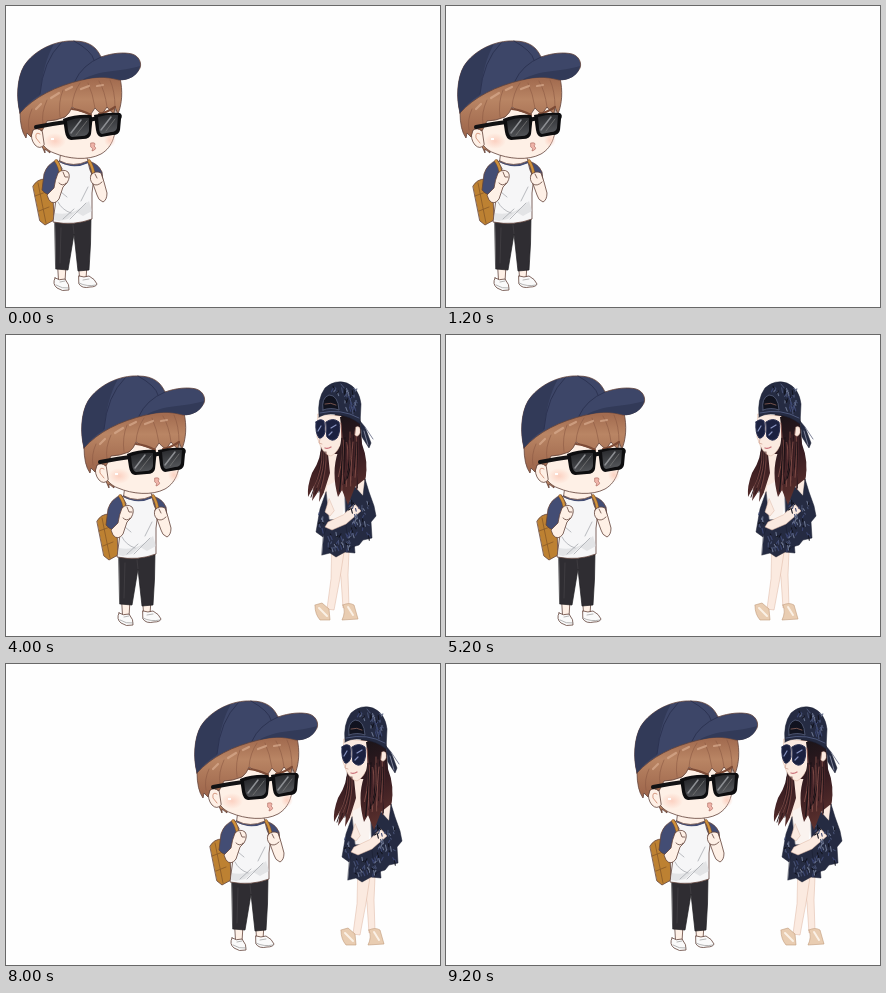
Recreate the animation shown at these times as an HTML page. Size 434 by 301 pixels, loop 10000 ms.

```html
<!DOCTYPE html>
<html lang="en">
<head>
<meta charset="utf-8">
<title>Two walkers</title>
<style>
  html, body { margin: 0; width: 100%; height: 100%; overflow: hidden; background: #fefefe; }
  svg { display: block; width: 434px; height: 301px; }
  path, ellipse { stroke-linejoin: round; stroke-linecap: round; }
  .line { fill: none; }
  .ink { stroke: #63433a; stroke-width: .8; }
  .skin { fill: #fef0e6; }
  .denim { fill: #252b42; stroke: #191d2e; stroke-width: .5; }
  .pale { fill: #fbeae0; stroke: #dcb5a1; stroke-width: .5; }
</style>
</head>
<body>
<svg viewBox="0 0 434 301">
  <defs>
    <linearGradient id="hair" x2="0" y2="1">
      <stop offset=".1" stop-color="#a36c50"/><stop offset=".4" stop-color="#b98564"/><stop offset="1" stop-color="#9b6349"/>
    </linearGradient>
    <linearGradient id="locks" x2=".2" y2="1">
      <stop stop-color="#191419"/><stop offset=".5" stop-color="#351b20"/><stop offset="1" stop-color="#5b302d"/>
    </linearGradient>
    <linearGradient id="glass" x2=".4" y2="1">
      <stop stop-color="#1b1c1f"/><stop offset="1" stop-color="#55575b"/>
    </linearGradient>
    <radialGradient id="blush">
      <stop stop-color="#fbc4b2" stop-opacity=".7"/><stop offset="1" stop-color="#fbc4b2" stop-opacity="0"/>
    </radialGradient>
  </defs>

  <g id="boy">
    <!-- backpack, legs and shoes -->
    <path class="ink" fill="#bd8132" d="M27 180Q31 173 39 173L47 190 48 214 39 219 34 215Z"/>
    <path class="line" stroke="#8a5a28" stroke-width=".8" d="M32 177L40 217M29 190L40 186M33 205L43 201"/>
    <path class="ink skin" d="M52 259H60L59 276H53ZM73 259H81L80 273H74Z"/>
    <path class="ink" fill="#fafafa" d="M49 272Q53 275 59 273Q64 279 63 284Q56 286 51 282Q46 278 49 272ZM73 270Q78 272 83 270Q89 273 91 278Q90 281 84 281Q76 283 73 278Z"/>
    <path class="line" stroke="#999" stroke-width=".7" d="M50 279Q56 283 63 282M73 277Q81 281 90 279M54 276L59 275M77 274L83 273"/>
    <path fill="#2f2d32" stroke="#1e1c20" stroke-width=".7" d="M49 215L85 212Q85 238 83 264L72 265 68 228 62 264 50 263Z"/>
    <path class="line" stroke="#454247" stroke-width=".7" d="M67 219L68 228M55 222L54 257"/>

    <!-- shirt, straps and arms -->
    <path class="ink" fill="#f6f6f7" d="M51 155Q67 163 83 156L89 163 86 187 86 213Q68 220 47 216L50 193 46 180Z"/>
    <path fill="#d8d9dd" d="M49 207Q67 211 83 195L86 205 77 210 70 206 62 213 53 215 48 214Z" opacity=".6"/>
    <path class="line" stroke="#a9abb0" stroke-width=".8" d="M52 196Q56 204 65 207M82 181L75 195M64 213L80 197M55 186L61 191M57 213L68 203"/>
    <path class="ink" fill="#434d74" d="M51 154Q41 158 38 168L36 184Q42 191 48 188L53 177 56 163ZM82 155Q92 157 96 166L97 175 89 176 84 164Z"/>
    <path class="line" stroke="#434d74" stroke-width="2" d="M54 155Q67 163 82 156"/>
    <path class="line" stroke="#8b572b" stroke-width="3.4" d="M50 155Q54 160 55 170M83 155Q87 161 88 171"/>
    <path class="line" stroke="#cf933d" stroke-width="2.2" d="M50 155Q54 160 55 170M83 155Q87 161 88 171"/>
    <path class="ink skin" d="M52 167Q57 162 62 166Q65 170 61 177L57 181 53 193Q48 200 43 194L41 189 48 182Q49 174 52 167ZM85 169Q89 164 95 167L98 176 101 187Q101 194 97 196Q92 194 91 189L87 178Q83 174 85 169Z"/>
    <path class="line ink" stroke-width=".6" d="M57 166L59 171 62 171M53 177Q57 181 60 177M89 168L91 172M87 178Q91 181 96 176"/>

    <!-- head -->
    <path class="ink skin" d="M55 147Q66 155 80 149L82 155Q67 162 54 155Z"/>
    <path class="ink" fill="url(#hair)" d="M34 136L39 147 39 143 44 147 44 136Z"/>
    <path class="ink skin" d="M31 106C28 125 34 142 48 147C62 153 82 155 95 148C107 141 111 128 110 104L60 88Z"/>
    <ellipse cx="49" cy="135" rx="11" ry="8" fill="url(#blush)"/>
    <ellipse cx="104" cy="134" rx="6" ry="7" fill="url(#blush)"/>
    <path fill="#fff" d="M45 132h3v2h-3z"/>
    <path class="ink skin" d="M36 125Q31 120 26 125Q24 133 29 139Q34 144 38 139Z"/>
    <path class="line" stroke="#d79b83" d="M34 128Q29 125 30 132L34 137"/>
    <path class="ink" fill="url(#hair)" d="M14 106C22 90 50 76 76 72C94 66 108 66 114 72C117 85 116 98 112 108L109 101 108 108Q104 105 101 101L96 108Q92 106 89 102L85 108Q73 106 66 101Q64 107 59 111Q49 115 41 115L36 125Q31 121 27 124L25 131 21 127 20 132Q14 124 14 106Z"/>
    <path class="line" stroke="#8b5a43" stroke-width=".6" d="M66 101Q67 87 74 77M89 102Q87 88 82 77M101 101Q99 85 93 75M109 101Q109 85 104 74M54 111Q52 96 57 84M37 118Q35 107 41 94M23 124Q21 114 26 103"/>
    <path class="line" stroke="#dcb092" stroke-width="2.2" opacity=".65" d="M45 92L53 87M60 84L66 81M75 83L83 80M91 80L97 79M30 103L35 98"/>
    <path class="line" stroke="#7d4b36" stroke-width="2.2" d="M66 103Q76 104 85 109M93 108Q102 106 109 101"/>
    <path class="line" stroke="#121214" stroke-width="4" d="M30 121Q45 118 60 116M82 114L93 112"/>
    <path fill="#0d0d0f" d="M57 113Q70 108 85 109Q87 111 86 118L85 128Q84 133 77 133L65 134Q60 133 59 126ZM88 109Q101 106 114 107Q117 109 115 113L114 124Q113 129 107 129L95 131Q91 130 90 124Z"/>
    <path fill="url(#glass)" d="M61 115Q72 111 83 112L83 125Q82 130 76 130L66 131Q63 130 62 124ZM92 111Q102 108 112 109L111 122Q110 126 105 126L96 128Q93 127 93 122Z"/>
    <path class="line" stroke="#8d8f93" stroke-width="1.5" d="M65 127L75 114M95 124L105 111"/>
    <path class="line" stroke="#777" stroke-width=".8" d="M70 129L81 115M100 125L109 113"/>
    <path fill="#f0b4a9" stroke="#b06d63" stroke-width=".7" d="M85 137Q91 136 88 140Q92 143 86 145Q88 142 85 141Z"/>

    <!-- cap -->
    <path class="ink" fill="#3d4668" d="M14 107C10 92 11 72 18 60C28 44 50 34 68 35C84 35 91 42 95 51C106 47 118 46 126 48C133 50 136 57 134 62C130 70 122 74 113 74C98 70 88 71 76 74C50 80 28 91 14 107Z"/>
    <path fill="#323a58" d="M14 107C10 92 11 72 18 60C25 50 36 42 48 38Q37 57 34 89Q22 96 14 107ZM76 74C94 63 116 66 134 60Q132 70 122 73Q116 75 111 73C98 70 88 71 76 74Z"/>
    <path class="line" stroke="#2b3250" stroke-width=".9" d="M34 88Q37 55 55 37M69 75Q76 59 95 51M68 35Q86 45 88 54"/>
  </g>

  <g id="girl">
    <!-- legs and shoes -->
    <path class="pale" d="M383 226H395L394 249 395 281 389 282 387 252Z"/>
    <path class="pale" d="M378 226H390L386 252 380 284 373 283 377 253Z"/>
    <path fill="#e9cdb2" stroke="#c19b7b" stroke-width=".6" d="M361 279L368 277 375 283 376 294H366Q361 288 361 280ZM389 279Q395 276 400 279L404 293 388 294Q392 286 389 279Z"/>
    <path class="line" stroke="#fbf1e6" stroke-width="2" d="M365 282L373 290M394 281L399 289"/>

    <path fill="url(#locks)" d="M367 116Q368 132 358 147Q353 160 354 171L360 160 358 175 366 163 365 176 378 151 400 179Q414 158 412 140Q406 118 406 91L382 87Z"/>
    <path fill="#fbe9df" d="M374 128H386L388 151 388 192 374 191 370 166 376 147Z"/>
    <path fill="#faf3ef" d="M373 160L386 153 391 171 388 194 373 193Z"/>

    <!-- jacket and skirt -->
    <path class="pale" d="M401 150Q410 148 413 161L409 174 399 169Z"/>
    <path class="denim" d="M371 194L398 193 401 227 391 226 382 231 376 227 368 229Z"/>
    <path class="denim" d="M372 166L366 183 362 206 369 211 375 194ZM391 167L400 160 409 170 411 153 415 166 420 180 422 190 417 196 418 212 409 214 405 219 395 222 392 200Z"/>
    <path class="pale" d="M401 178L407 185 392 198 378 204 371 201 374 196 389 189ZM375 173L371 186 376 190 380 185Z"/>
    <g id="specks"></g>

    <!-- head -->
    <path class="pale" d="M364 88L387 90 389 113Q384 127 377 130Q370 129 366 119L363 111Z"/>
    <path class="line" stroke="#cb727a" stroke-width="1.3" d="M371 122Q374 123 377 121"/>
    <path class="line" stroke="#cfa090" stroke-width=".7" d="M366 113L365 117 368 118"/>
    <path fill="url(#locks)" d="M386 91Q390 113 384 126Q377 146 384 171L388 164 394 179 401 161 411 153Q415 136 408 118L406 91Z"/>
    <g id="strands"></g>
    <path class="pale" d="M402 101Q407 99 406 107Q404 112 401 109Z"/>
    <path fill="#1b2140" stroke="#2b3152" d="M362 96Q366 92 370 95L371 106Q369 113 365 112Q361 107 362 96ZM372 96Q379 91 385 96Q387 106 383 112Q378 117 373 111Z"/>
    <path class="line" stroke="#8793c0" stroke-width="1.2" d="M364 105L367 100M375 109L378 106M377 102L382 99"/>

    <!-- backwards cap -->
    <path class="denim" d="M406 95L411 101 417 117 415 122 408 111Z"/>
    <path class="line" stroke="#808499" d="M411 101L419 113M410 105L414 119"/>
    <path class="denim" d="M365 91Q363 73 371 62Q381 53 393 57Q405 62 407 78L406 98Q396 90 384 89Q374 86 365 91Z"/>
    <path fill="#11131f" stroke="#59617e" stroke-width=".8" d="M369 84Q367 72 375 69Q384 69 385 84Q377 81 369 84Z"/>
    <path class="line" stroke="#4d577a" d="M366 87Q387 82 405 92M387 58Q398 69 399 88"/>
    <path class="line" stroke="#8e6258" stroke-width=".8" d="M371 78Q377 76 382 79"/>
    <g id="capSpecks"></g>
  </g>
</svg>
<script>
const $ = id => document.getElementById(id);
let seed = 7;
const rand = (a, b) => {
  seed = seed * 16807 % 2147483647;
  return a + (b - a) * seed / 2147483647;
};

function addLine(parent, d, color, width) {
  const p = document.createElementNS('http://www.w3.org/2000/svg', 'path');
  for (const [k, v] of Object.entries({ d, fill: 'none', stroke: color, 'stroke-width': width })) p.setAttribute(k, v);
  $(parent).append(p);
}

function speckle(parent, count, x0, x1, y0, y1) {
  const colors = ['#6b7590', '#3b4570', '#12141f', '#465072'];
  for (let i = 0; i < count; i++) {
    addLine(parent, `M${rand(x0, x1)} ${rand(y0, y1)}l${rand(-2, 2)} ${rand(1, 5)}`, colors[i % 4], 1.1);
  }
}

for (let i = 0; i < 18; i++) {
  const x = 387 + i, color = ['#7d4a45', '#150f14', '#4a262a'][i % 3];
  addLine('strands', `M${x} ${rand(97, 118)}Q${x + rand(-2, 4)} 130 ${x - 2 + rand(-2, 3)} ${rand(145, 172)}`, color, 1);
}
for (let i = 0; i < 6; i++) {
  addLine('strands', `M${367 + i} 126Q${368 + i} 142 ${357 + i * 2} ${rand(158, 172)}`, i % 2 ? '#754743' : '#2a181d', .9);
}
speckle('specks', 44, 396, 415, 174, 210);
speckle('specks', 36, 372, 397, 206, 223);
speckle('specks', 9, 365, 370, 185, 203);
speckle('capSpecks', 34, 388, 403, 62, 84);
speckle('capSpecks', 8, 372, 388, 60, 66);

// Each pose holds for two seconds, then jumps.
const HOLD = 2000;
const boyAt = [[0, 0], [24, 10], [64, 6], [88, 6], [177, 2]];
const girlAt = [null, [0, 0], [-52, -9], [-64, -9], [-26, -13]];
const start = performance.now();

function place(id, at) {
  $(id).setAttribute('visibility', at ? 'visible' : 'hidden');
  if (at) $(id).setAttribute('transform', `translate(${at})`);
}

function draw() {
  const pose = Math.floor((performance.now() - start) / HOLD) % boyAt.length;
  place('boy', boyAt[pose]);
  place('girl', girlAt[pose]);
  requestAnimationFrame(draw);
}
draw();
</script>
</body>
</html>
```
